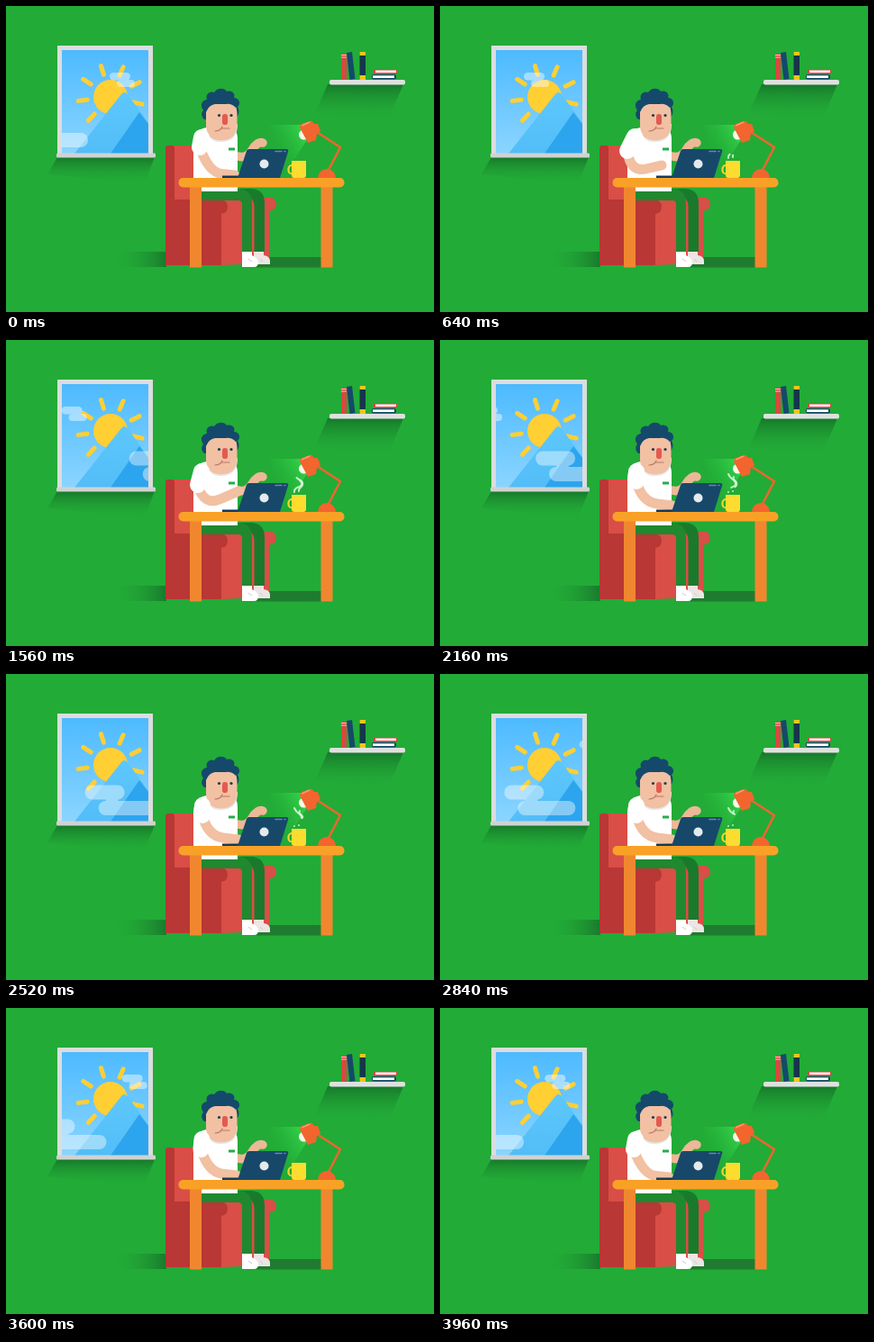
Write an HTML page that moves like this. It is 475 px wide and 340 px high and loops after 4 s.

```html
<!DOCTYPE html>
<html lang="en">
<head>
<meta charset="utf-8">
<title>Working at the desk</title>
<style>
  html, body { margin: 0; width: 100%; height: 100%; overflow: hidden; background: #22ab37; }
  svg { display: block; width: 100%; height: 100%; }
  .line { fill: none; stroke-linecap: round; stroke-linejoin: round; }
</style>
</head>
<body>
<svg viewBox="0 0 475 340">
  <defs>
    <linearGradient id="sky" x2="0" y2="1"><stop stop-color="#4dbaff"/><stop offset="1" stop-color="#8bd5ff"/></linearGradient>
    <linearGradient id="slope" x2="0" y2="1"><stop stop-color="#5dc7fc"/><stop offset="1" stop-color="#52bdf7"/></linearGradient>
    <linearGradient id="fade" x2="0" y2="1"><stop stop-color="#17782a"/><stop offset="1" stop-color="#22ab37" stop-opacity="0"/></linearGradient>
    <linearGradient id="floor"><stop stop-color="#22ab37" stop-opacity="0"/><stop offset="1" stop-color="#197a2c"/></linearGradient>
    <linearGradient id="glow" gradientUnits="userSpaceOnUse" x1="334" y1="139" x2="296" y2="160"><stop stop-color="#36d94c"/><stop offset="1" stop-color="#22ab37" stop-opacity=".1"/></linearGradient>
    <clipPath id="glass"><path d="M62 49H158V164H62Z"/></clipPath>
  </defs>

  <!-- window -->
  <path d="M57 168H165L153 198L46 187Z" fill="url(#fade)"/>
  <path d="M57 44H163V166H57Z" fill="#dcdddd"/>
  <g clip-path="url(#glass)">
    <path d="M62 49H158V164H62Z" fill="url(#sky)"/>
    <g id="sun" fill="#ffcf34" stroke="#ffcf34" stroke-width="5" stroke-linecap="round"><circle cx="116" cy="101" r="19" stroke="none"/></g>
    <path d="M76 164L128 98Q131 94 135 98L158 130V164Z" fill="url(#slope)"/>
    <path d="M116 164L148 118L158 131V164Z" fill="#2ca5ee"/>
    <g id="highCloud" fill="#fff" opacity=".45">
      <rect y="74" width="23" height="8.5" rx="4.2"/><rect x="8" y="82" width="20" height="8" rx="4"/>
    </g>
    <g id="lowCloud" fill="#fff" opacity=".42">
      <rect y="123.5" width="44" height="16" rx="8"/><rect x="15" y="141" width="64" height="16" rx="8"/>
      <path d="M22 139H38Q35 140 38 141.5H22Q25 140 22 139Z"/>
    </g>
  </g>
  <rect x="56" y="163.5" width="110" height="5" rx="1.5" fill="#cfd3d1"/>

  <!-- shelf -->
  <path d="M357 87H441L424 127L343 119Z" fill="url(#fade)"/>
  <rect x="359" y="82" width="84" height="5.5" rx="2" fill="#dfe1df"/>
  <path d="M372 53H378V82H372Z" fill="#d94840"/>
  <path d="M372 54.5H378M372 57H378" stroke="#f4c9c2"/>
  <path d="M378 52L384 51L387.5 81L381.5 82Z" fill="#14496b"/>
  <path d="M392.5 51H399V82H392.5Z" fill="#17354b"/>
  <path d="M392.5 51H399V55H392.5ZM392.5 77H399V82H392.5Z" fill="#f3c51c"/>
  <rect x="408" y="70" width="26" height="5.5" rx="2" fill="#d94840"/>
  <path d="M410 71.5H433V74H410Z" fill="#fff"/>
  <rect x="406" y="76" width="27" height="5.5" rx="2" fill="#14496b"/>
  <path d="M407 77.3H431V80H407Z" fill="#fff"/>

  <!-- chair and legs -->
  <path d="M118 273H178V290H118Z" fill="url(#floor)"/>
  <path d="M278 279H350V290.5H278Z" fill="#1f7b30"/>
  <path d="M183 155H212V216H183Z" fill="#d94e46"/>
  <path d="M177 158Q177 155 180 155H184Q187 155 187 158V215H239Q246 215 246 223T239 231V288H177Z" fill="#b93734"/>
  <path d="M239 231Q246 230 246 223T239 215V205H262V287L239 288ZM262 213H292V279H262Z" fill="#d94e46"/>
  <circle cx="292.500" cy="220" r="7.500" fill="#d94e46"/>
  <path d="M258 203H271Q287 203 287 219V273H275.500V222Q275 212 266 212Z" fill="#1a7a2c"/>
  <path d="M217 203H257Q273 203 273 220V274H262V220Q262 216 257 216H217Z" fill="#20882f"/>
  <path d="M275 273H286V277Q293 278 293 283V287H275Z" fill="#ece5e3"/>
  <path d="M262 273H273V277Q280 280 280 285Q280 290 275 290H262Z" fill="#fff"/>
  <path d="M269 281L273 284M282 281L285 284" stroke="#c5cbd0"/>

  <!-- person -->
  <path d="M258 167Q267 170 273 160T285 152" class="line" stroke="#eeb798" stroke-width="9.500"/>
  <path d="M208 206V153Q209 135 225 135H247Q257 136 257 148V206Z" fill="#fff"/>
  <path d="M247 157.500H254V160.500H247Z" fill="#25ae4a"/>
  <path d="M222 129Q223 153 239 151Q257 151 257 131Z" fill="#e6e7e8"/>
  <path d="M220 126C215 121 218 117 219 116C215 110 217 105 223 104C221 98 226 94 231 96C234 91 242 90 245 95C251 93 255 98 253 102C259 102 261 109 257 112C260 117 258 122 255 124Z" fill="#14496b"/>
  <path d="M222 115Q224 107 232 108H248Q256 107 256.500 119V132Q256 149 239 149.500Q222 149 222 132Z" fill="#f2c0a2"/>
  <path d="M222 118V107H255V113Q250 108 244 109H232Q225 110 222 118Z" fill="#14496b"/>
  <circle cx="236.500" cy="121.500" r="1.600" fill="#173d58"/><circle cx="250" cy="121.500" r="1.600" fill="#173d58"/>
  <rect x="240" y="120" width="6" height="12" rx="2.800" fill="#e25a50"/>
  <path d="M232 139Q238 139 240 134M239 136H248" class="line" stroke="#b77b68" stroke-width="1.200"/>
  <path id="arm" class="line" stroke="#f2c0a2" stroke-width="11"/>
  <path id="sleeve" class="line" stroke="#fff" stroke-width="18"/>

  <!-- lamp, mug, laptop -->
  <path d="M293 132H330L334 149L307 190H301Z" fill="url(#glow)"/>
  <path d="M357 184L371 157L345 140" class="line" stroke="#f2652e" stroke-width="2.500"/>
  <path d="M346 191A9.500 9.500 0 0 1 366 191Z" fill="#f2652e"/>
  <circle cx="330.500" cy="143" r="5.500" fill="#f4fbe8"/>
  <path d="M326 135Q326 131 331 130L339 127.500L342 131L346 131L349 139L345 142L344 149L335 152Z" fill="#f2652e"/>
  <path d="M328 133L337 129" stroke="#ff9a70" stroke-width="1.500"/>
  <g class="line" stroke="#e9ffe9" stroke-opacity=".8" stroke-width="2">
    <path class="steam" pathLength="100" d="M320 169C319 162 329 165 328 159C327 154 323 156 320 149"/>
    <path class="steam" pathLength="100" d="M325 168C324 163 331 164 329 158C327 155 324 155 326 152"/>
  </g>
  <rect x="313.500" y="177" width="8" height="9.500" rx="4" fill="none" stroke="#f4d42b" stroke-width="2.200"/>
  <path d="M317 172H333V188Q333 191 330 191H320Q317 191 317 188Z" fill="#fbdc2f"/>
  <path d="M240 188.500H262V191H240Z" fill="#12395a"/>
  <path d="M270 159H311Q314 159 313 162L304 191H257L267 161Q267.500 159 270 159Z" fill="#17486a"/>
  <path d="M299 161.500H306M309 161.500H310" class="line" stroke="#6787a1" stroke-width="1.600"/>
  <circle cx="286.500" cy="175.500" r="5" fill="#e4eaec"/>

  <!-- table -->
  <path d="M204 200H217V290.500H204ZM349.500 200H362.500V290.500H349.500Z" fill="#f0872f"/>
  <rect x="191.500" y="191" width="184" height="10.500" rx="5" fill="#f9a126"/>
</svg>
<script>
const LOOP = 4000;
const byId = id => document.getElementById(id);
const steam = document.querySelectorAll('.steam');
const clamp = v => Math.max(0, Math.min(1, v));
const ease = v => v * v * (3 - 2 * v);

// time, shoulder, sleeve end, elbow, hand
const poses = [
  [0,    217, 146, 215, 157, 225, 185, 254, 188],
  [640,  216, 145, 208, 161, 211, 185, 246, 177],
  [1560, 217, 146, 213, 161, 219, 185, 258, 168],
  [2160, 218, 146, 218, 157, 224, 180, 258, 184],
  [3200, 218, 146, 218, 157, 224, 180, 258, 184],
  [LOOP, 217, 146, 215, 157, 225, 185, 254, 188]
];

function poseAt(time) {
  const next = poses.findIndex(pose => pose[0] > time);
  const from = poses[next - 1], to = poses[next];
  const mix = ease((time - from[0]) / (to[0] - from[0]));
  return from.map((value, i) => value + (to[i] - value) * mix);
}

function moveX(id, x) {
  byId(id).setAttribute('transform', `translate(${x})`);
}

for (let angle = -227; angle <= 13; angle += 40) {
  const ray = document.createElementNS('http://www.w3.org/2000/svg', 'path');
  ray.setAttribute('d', 'M142 101H152');
  ray.setAttribute('transform', `rotate(${angle} 116 101)`);
  byId('sun').append(ray);
}

function draw(now) {
  const time = now % LOOP;

  const highTime = time < 2600 ? time : time - LOOP;
  moveX('highCloud', 115 - highTime * .0342);
  const lowTime = time < 800 ? time + LOOP : time;
  moveX('lowCloud', 216.500 - lowTime * .0511);

  const [, sx, sy, cx, cy, ex, ey, hx, hy] = poseAt(time);
  byId('sleeve').setAttribute('d', `M${sx} ${sy}L${cx} ${cy}`);
  byId('arm').setAttribute('d', `M${cx} ${cy}Q${ex} ${ey} ${(ex + hx) / 2} ${(ey + hy) / 2}L${hx} ${hy}`);

  steam.forEach((path, i) => {
    const head = 100 * clamp((time - 400 - i * 80) / 1400);
    const tail = 100 * clamp((time - 1800 + i * 80) / 1500);
    path.setAttribute('stroke-dasharray', `0 ${tail} ${head - tail} 200`);
    path.style.visibility = head > tail ? 'visible' : 'hidden';
  });
}

const start = performance.now();
function tick() {
  draw(performance.now() - start);
  requestAnimationFrame(tick);
}
tick();
</script>
</body>
</html>
```
